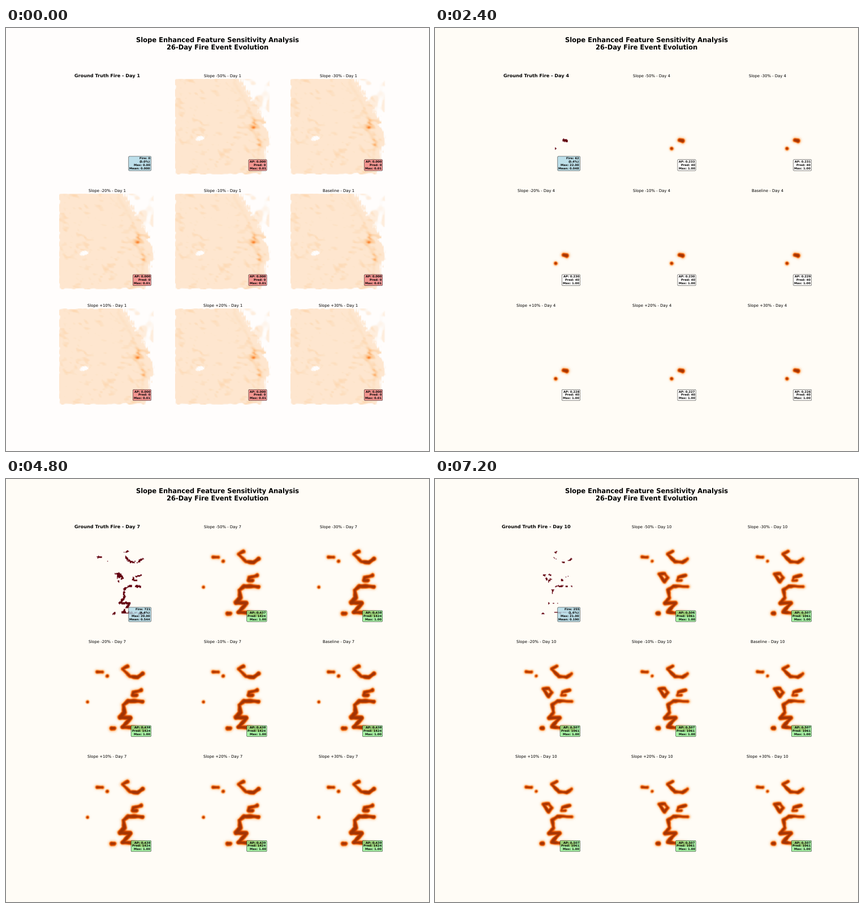
A matplotlib script that plays this animation: 748x748 px, repeating every 8000 ms.

```python
import numpy as np
import matplotlib
import matplotlib.pyplot as plt
from matplotlib.animation import FuncAnimation

plt.rcParams["font.family"] = "DejaVu Sans"
plt.rcParams["text.hinting"] = "none"

N = 128            # cells per side
SIDE = 169.4       # panel side in pixels, the unit of all map coordinates
K = 17 / 18        # point-size scale for this canvas
DAYS = range(1, 11)
LAST_CALM = 3      # up to this day the forecast shows only terrain risk
ORANGES = matplotlib.colormaps["Oranges"]
FIRE = np.array([98, 0, 15]) / 255
PALE = np.array([255, 253, 252]) / 255
CREAM = np.array([255, 252, 246]) / 255

axis = (np.arange(N) + 0.5) * SIDE / N
X, Y = np.meshgrid(axis, axis)
COL, ROW = np.meshgrid(np.arange(N), np.arange(N))

# Fire fronts: first day, last day, half width, key points
FRONTS = [
    (3, 4, 2.2, (133, 109), (138, 110)),
    (3, 4, 1.5, (119, 123.5)),
    (5, 5, 7, (127, 46), (140, 51)),
    (5, 5, 8, (147, 108), (131, 118), (132, 129), (144, 142)),
    (5, 5, 2, (112, 131), (105, 158)),
    (5, 5, 2, (134, 85)),
    (5, 6, 0.8, (50, 102)),
    (5, 10, 1.8, (67, 49), (76, 49)),
    (5, 10, 1.2, (85, 56)),
    (5, 10, 2.4, (93, 148), (97, 148)),
    (6, 10, 1.9, (121, 39), (112, 44), (125, 57), (138, 58), (147, 52)),
    (6, 10, 1.8, (144, 81), (131, 85), (129, 90), (136, 90)),
    (6, 10, 2.1, (107, 130), (115, 120), (113, 107), (122, 100), (147, 101)),
    (6, 10, 2.2, (107, 130), (126, 130), (112, 146), (150, 149)),
    (7, 7, 4, (99, 82), (105, 82)),
    (7, 10, 1.9, (97, 79), (107, 78), (112, 85), (106, 92), (97, 79)),
]
RIDGE = [(104, 8), (123, 38), (141, 80), (137, 92), (150, 112), (142, 165)]

# Caption values on key days; the days between are interpolated
KEY_DAYS = [2, 3, 4, 6, 8, 10]
CAPTIONS = {
    "fire": [0, 43, 62, 842, 600, 255],
    "top": [0, 10, 22, 21, 20, 21],
    "mean": [0, .021, .048, .683, .405, .190],
    "ap": [0, .005, .22865, .36488, .5116, .50695],
    "tilt": [0, 0, -9e-5, 2.9e-5, 8e-6, 1e-5],
    "pred": [0, 0, 40, 1606, 1242, 1061],
}
SLOPES = [-50, -30, -20, -10, 0, 10, 20, 30]


def noise(seed, nx, ny, width=N):
    """Smooth noise with zero mean and unit spread."""
    def weights(count, size):
        t = np.linspace(0, count - 1, size)[:, None]
        w = np.exp(-((t - np.arange(count)) / 0.62) ** 2)
        return w / w.sum(1, keepdims=True)
    grid = np.random.RandomState(seed).rand(ny, nx)
    f = weights(ny, N) @ grid @ weights(nx, width).T
    return (f - f.mean()) / f.std()


def sheared(seed, nx, ny):
    """Noise drawn out along the falling diagonal."""
    f = noise(seed, nx, ny, 2 * N)
    return np.stack([r[64 - j // 2:64 - j // 2 + N] for j, r in enumerate(f)])


def distance(pts):
    """Distance of every cell to a polyline, or to a single point."""
    best = np.full((N, N), 1e3)
    for (ax, ay), (bx, by) in zip(pts, pts[1:] or pts):
        dx, dy = bx - ax, by - ay
        t = ((X - ax) * dx + (Y - ay) * dy) / max(dx * dx + dy * dy, 1e-9)
        t = np.clip(t, 0, 1)
        best = np.minimum(best, np.hypot(X - ax - t * dx, Y - ay - t * dy))
    return best


def bump(v, centre, width):
    return np.exp(-((v - centre) / width) ** 2)


def fronts(day):
    """Half width and distance field of each front alive on a day."""
    thin = 0.12 * max(0, day - 6)
    return [(r - thin, distance(pts)) for first, last, r, *pts in FRONTS
            if first <= day <= last]


def blend(back, front, a):
    a = np.clip(a, 0, 1)[..., None]
    return back * (1 - a) + front * a


def enlarge(rgb):
    return np.repeat(np.repeat(rgb, 4, 0), 4, 1).astype(np.float32)


def background(day):
    return PALE if day <= LAST_CALM else CREAM


def truth_map(day):
    """Burning cells: rough-edged fronts that break up as days pass."""
    rgb = np.ones((N, N, 3)) * background(day)
    rough = np.random.RandomState(day).uniform(-0.8, 0.6, (N, N))
    alive = noise(day + 50, 45, 45) > 0.45 * (day - 6) - 1.2
    for r, d in fronts(day):
        rgb[(d < r + rough) & (alive | (day < 6))] = FIRE
    return enlarge(rgb)


def spread_map(day):
    """Forecast: the previous day's fire, widened and softened."""
    wobble = 0.45 * noise(day, 24, 24)
    weave = 0.19 + 0.05 * ((COL + ROW) % 2)
    inside, halo = np.full((N, N), -50.0), 0
    for r, d in fronts(day - 1):
        depth = r + 1.6 + wobble - d
        inside = np.logaddexp(inside, depth)
        reach = 1.2 + 0.8 * r
        halo = np.maximum(halo, weave * np.exp(np.minimum(depth, 0) / reach))
    p = np.maximum(0.9 / (1 + np.exp(-inside / 0.75)), halo)
    return enlarge(blend(background(day), ORANGES(p)[..., :3],
                         (p - 0.035) / 0.07))


def terrain_map(day):
    """Low-risk terrain: patches and an eastern ridge, open at the corner."""
    dry, closing = day == 2, day == 3
    base = 0.13 if dry else 0.118
    fine, broad = sheared(5, 60, 40), noise(8, 15, 13)
    spots = np.clip(0.8 * fine + 0.5 * broad - (0.1 if dry else 0.6), 0, 2)
    v = base + (0.07 if dry else 0.05) * spots

    d = distance(RIDGE)
    force = 0.15 + 0.8 * bump(Y, 112, 13)
    force += 0.35 * bump(Y, 86, 10) if closing else bump(Y, 86, 12)
    force += 0.4 * bump(Y, 65, 12) + 0.3 * bump(Y, 145, 14) if dry else 0
    v += (0.3 if dry or closing else 0.18) * force * (
        bump(d, 0, 3) * (0.85 + 0.2 * fine)
        + 0.3 * bump(d, 0, 9) * np.clip(0.6 + 0.6 * fine, 0, 2))
    pairs = (COL % 2) * (ROW % 2)
    v *= 1 + 0.2 * (pairs - 0.3) * np.clip((v - base) * 12, 0, 1)

    ragged = noise(21, 34, 40)
    stripes = COL % 3 == 0
    coast = 167 - 10 * bump(Y, 80, 11) - 17 * np.clip((Y - 105) / 64, 0, 1)
    slant = 114 + (0.42 if closing else 0.6) * Y
    edge = np.minimum(coast, slant) - X + 2.2 * ragged + 2 * stripes
    patches = np.clip(noise(day + 30, 17, 20) + 0.1, 0, 0.7)
    if closing:
        patches = np.clip(patches + 0.3, 0, 0.8) * (stripes | (ROW % 5 == 0))
    patches = np.where(Y < (90 if closing else 60), patches, 0)
    a = np.maximum(edge / 3, np.minimum(patches, (coast - X) / 3))
    rim = 1.8 if closing else 0.6
    border = np.minimum(np.minimum(X, Y) - rim, 167.5 - Y)
    a = np.minimum(a, border / 1.5 + 0.6 * ragged + 1)

    size = 9 if closing else 6.5
    lake = np.hypot(X - 44, 1.8 * (Y - 106) + 0.3 * (X - 44)) / size
    speck = 0 if closing else 0.8 * ((COL * 3 + ROW * 5) % 4 == 0)
    a = np.minimum(a, (lake - 1) * 3 + 0.4 * ragged + speck)
    return enlarge(blend(background(day), ORANGES(v)[..., :3], a))


def caption(name, day):
    return np.interp(day, KEY_DAYS, CAPTIONS[name])


def truth_note(day):
    cells = round(caption("fire", day))
    return (f"Fire: {cells}\n({cells / N ** 2:.1%})\n"
            f"Max: {round(caption('top', day)):.2f}\n"
            f"Mean: {caption('mean', day):.3f}")


def slope_note(day, slope):
    """Text and box colour for one forecast panel."""
    ap = caption("ap", day) + caption("tilt", day) * slope
    peak = 1 if day > LAST_CALM else 0.0092 * day - 0.0029 + 2e-5 * slope
    text = (f"AP: {ap:.3f}\nPred: {round(caption('pred', day))}\n"
            f"Max: {peak:.2f}")
    color = "lightgreen" if ap > 0.3 else "white" if ap > 0.1 else "lightcoral"
    return text, color


truths = {d: truth_map(d) for d in DAYS}
forecasts = {d: (terrain_map if d <= LAST_CALM else spread_map)(d)
             for d in DAYS}

fig, axes = plt.subplots(3, 3, figsize=(17, 17), dpi=44)
fig.suptitle("Slope Enhanced Feature Sensitivity Analysis\n"
             "26-Day Fire Event Evolution", fontsize=20 * K,
             fontweight="bold", linespacing=1.23)
panels = []
for k, ax in enumerate(axes.flat):
    ax.axis("off")
    image = ax.imshow(truths[1], interpolation="hanning")
    title = ax.set_title("", fontsize=(12 if k else 14) * K, pad=6 * K,
                         fontweight="normal" if k else "bold")
    note = ax.text(0.95, 0.05, "", transform=ax.transAxes, ha="right",
                   va="bottom", fontsize=9 * K, fontweight="bold",
                   linespacing=1.25,
                   bbox=dict(boxstyle="round,pad=0.3", facecolor="lightblue",
                             alpha=0.8, linewidth=K))
    panels.append((image, title, note))


def update(frame):
    day = frame + 1
    fig.set_facecolor(background(day))
    image, title, note = panels[0]
    image.set_data(truths[day])
    title.set_text(f"Ground Truth Fire - Day {day}")
    note.set_text(truth_note(day))

    for slope, (image, title, note) in zip(SLOPES, panels[1:]):
        name = f"Slope {slope:+d}%" if slope else "Baseline"
        text, color = slope_note(day, slope)
        image.set_data(forecasts[day])
        title.set_text(f"{name} - Day {day}")
        note.set_text(text)
        note.get_bbox_patch().set_facecolor(color)
    return []


anim = FuncAnimation(fig, update, frames=len(DAYS), interval=800, repeat=True,
                     repeat_delay=0, blit=False)
plt.show()
```
